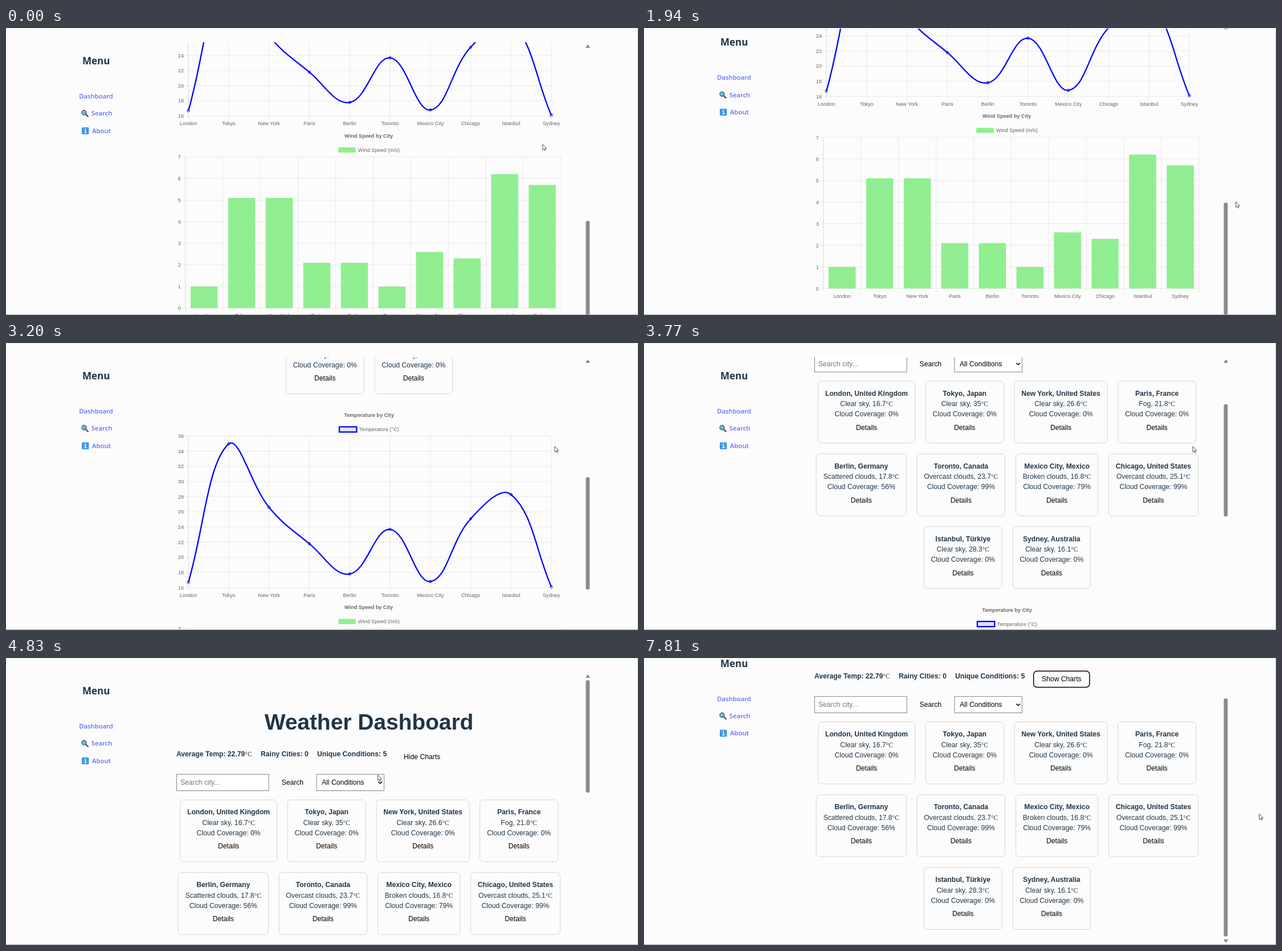
These frames come from a looping animation (1109x505 px, 8 s). An HTML page:

```html
<!DOCTYPE html>
<html lang="en">
<head>
<meta charset="utf-8">
<title>Weather Dashboard</title>
<style>
html, body { margin: 0; width: 100%; height: 100%; overflow: hidden; background: #fcfcfc; }
svg { display: block; }
#stage {
  --s: 0; --p: 0; --x: 0; --y: 0; --k: .375; --h: 198;
  font: 12.16px "Liberation Sans", Arial, sans-serif;
  fill: #213547;
  animation: 8s step-end -4ms infinite;
  animation-name: scroll, page, cursor, thumb;
}
#page { transform: translateY(calc(var(--p) * -1px)); }
#content { transform: translateY(calc(var(--s) * -1px)); }
#cursor { transform: translate(calc(var(--x) * 1px), calc(var(--y) * 1px)); }
#thumb { height: calc(var(--h) * 1px); transform: translateY(calc(var(--s) * var(--k) * 1px)); }
.shown { animation: shown 8s step-end -4ms infinite; }
.hidden { animation: hidden 8s step-end -4ms infinite; }
#hover { animation: hover 8s step-end -4ms infinite; }
.mid { text-anchor: middle; }
.end { text-anchor: end; }
.bold { font-weight: 700; }
.black { fill: #000; }
.hint { fill: #757575; }
.deg { font: 400 11.5px "Liberation Serif", serif; }
.h1 { font-size: 38.9px; }
.menu { font: 700 17px "Open Sans", sans-serif; }
.link { font: 600 11.3px "Open Sans", sans-serif; fill: #646cff; }
.chart { font-size: 9.12px; fill: #666; }
.grid { fill: none; stroke: #000; stroke-opacity: .1; stroke-width: .76; }
.card { fill: none; stroke: #ccc; stroke-width: .8; }
.field { fill: #fff; stroke: #767676; stroke-width: .9; }
.bar { fill: #8b8b8b; }

@keyframes scroll {
  0% { --s: 800.5 }
  1.875% { --s: 802.3 }
  38.5% { --s: 740 }
  40% { --s: 525 }
  42.125% { --s: 425 }
  43.75% { --s: 290 }
  45.25% { --s: 198 }
  47.125% { --s: 182.5 }
  48.75% { --s: 150 }
  50.375% { --s: 35 }
  52.125% { --s: 0 }
  86.5%, 100% { --s: 88.5 }
}
@keyframes page {
  0% { --p: 0 }
  8.5% { --p: 1 }
  10.25% { --p: 48.5 }
  24.25% { --p: 32.7 }
  26.125% { --p: 0 }
  97.625%, 100% { --p: 48.5 }
}
@keyframes cursor {
  0% { --x: 941.7; --y: 204.8 }
  5.625% { --x: 1038.5; --y: 305.8 }
  34.75% { --x: 963; --y: 182 }
  57.5% { --x: 685; --y: 210.5 }
  60.375% { --x: 652.5; --y: 205.8 }
  62% { --x: 700; --y: 190.5 }
  64.125% { --x: 728; --y: 178 }
  65.75% { --x: 740; --y: 162 }
  67.375% { --x: 744; --y: 148 }
  72.75% { --x: 744; --y: 172 }
  81.5% { --x: 850; --y: 179 }
  83.125% { --x: 957.3; --y: 188 }
  91.5% { --x: 1034; --y: 224 }
  94%, 100% { --x: 1079.7; --y: 274.3 }
}
@keyframes thumb {
  0% { --k: .375; --h: 198 }
  78%, 100% { --k: .91; --h: 419 }
}
@keyframes hover {
  0% { stroke: transparent }
  64.125% { stroke: #646cff }
  67.375% { stroke: transparent }
  72.75% { stroke: #646cff }
  74.5%, 100% { stroke: #000 }
}
@keyframes shown {
  0% { visibility: visible }
  78%, 100% { visibility: hidden }
}
@keyframes hidden {
  0% { visibility: hidden }
  78%, 100% { visibility: visible }
}
</style>
</head>
<body>
<svg id="stage" width="1109" height="505" viewBox="0 0 1109 505">
  <defs><clipPath id="view"><rect x="290" y="25" width="740" height="528"/></clipPath></defs>
  <g id="page">
    <g id="nav">
      <path d="M140.4 152.4l3.4 3.2" stroke="#5b4a4f" stroke-width="2.4" stroke-linecap="round"/>
      <circle cx="137" cy="149" r="4" fill="#55bdf0" stroke="#4a5560" stroke-width="1.3"/>
      <path d="M134.8 148.6a2.4 2.4 0 0 1 2-2" fill="none" stroke="#c9ecfb" stroke-width=".9"/>
      <rect x="133" y="174.8" width="12.4" height="12.2" rx="1.6" fill="#3f97e8"/>
      <path d="M137.6 179.6h2v4.4m-2.2 0h4.2" fill="none" stroke="#fff" stroke-width="1.3"/>
      <circle cx="139.2" cy="177.3" r="1" fill="#fff"/>
    </g>
    <g clip-path="url(#view)"><g id="content"></g></g>
    <path class="bar" d="M1017 35h8l-3.2-5.2q-.8-1-1.6 0z"/>
    <path class="bar" d="M1017 543.6h8l-3.2 5.2q-.8 1-1.6 0z"/>
    <rect id="thumb" class="bar" x="1017.4" y="39" width="6.8" rx="3.4"/>
  </g>
  <rect width="1109" height="1.2" fill="#e3f3ec"/>
  <path d="M0 504.5H1109" stroke="#a3a3a3"/>
  <path d="M1108.5 1V505" stroke="#cfcfcf"/>
  <path id="cursor" d="M0 0V9.8L2.2 7.7 3.7 11.1 5.2 10.4 3.8 7.1H6.8Z" fill="#fff" stroke="#333" stroke-width=".85" stroke-linejoin="round"/>
</svg>
<script>
const cities = ['London', 'Tokyo', 'New York', 'Paris', 'Berlin', 'Toronto', 'Mexico City', 'Chicago', 'Istanbul', 'Sydney'];
const countries = ['United Kingdom', 'Japan', 'United States', 'France', 'Germany', 'Canada', 'Mexico', 'United States', 'Türkiye', 'Australia'];
const skies = ['Clear sky', 'Clear sky', 'Clear sky', 'Fog', 'Scattered clouds', 'Overcast clouds', 'Broken clouds', 'Overcast clouds', 'Clear sky', 'Clear sky'];
const temps = [16.7, 35, 26.6, 21.8, 17.8, 23.7, 16.8, 25.1, 28.3, 16.1];
const cover = [0, 0, 0, 0, 56, 99, 79, 99, 0, 0];
const winds = [1, 5.1, 5.1, 2.1, 2.1, 1, 2.6, 2.3, 6.2, 5.7];
const cardLeft = [305.7, 494, 650, 831.5, 302, 479, 652.5, 815.4, 491, 647];
const cardWidth = [169.8, 137.3, 163, 137.2, 158.6, 154.6, 144.2, 157, 137.3, 136.6];

const text = (x, y, str, cls = '') =>
  `<text x="${x}" y="${y}" class="${cls}">${str.replace('℃', '<tspan class="deg">°C</tspan>')}</text>`;
const box = (x, y, w, h, attrs) => `<rect x="${x}" y="${y}" width="${w}" height="${h}" ${attrs}/>`;
const hLine = (x1, x2, y) => `M${x1} ${y}H${x2}`;
const vLine = (x, y1, y2) => `M${x} ${y1}V${y2}`;

function header() {
  return text(637, 125.8, 'Weather Dashboard', 'h1 bold mid') +
    text(299, 172.8, 'Average Temp: 22.79℃', 'bold') +
    text(447, 172.8, 'Rainy Cities: 0', 'bold') +
    text(546, 172.8, 'Unique Conditions: 5', 'bold') +
    `<g class="shown">${box(683.6, 160, 93.8, 28.4, 'id="hover" rx="6" fill="none" stroke-width="1.4"')}${text(698, 178.3, 'Hide Charts', 'black')}</g>` +
    `<g class="hidden">${box(683.6, 160, 98.2, 28.4, 'rx="6" fill="#fdfdfd" stroke="#000" stroke-width="1.5"')}${text(698, 178.3, 'Show Charts', 'black')}</g>` +
    box(299.5, 204.7, 161.6, 28.8, 'class="field"') + text(306, 223.3, 'Search city...', 'hint') +
    text(483.6, 223.3, 'Search', 'black') +
    box(545, 204.7, 118.3, 28.8, 'class="field"') + text(554, 223.3, 'All Conditions', 'black') +
    '<path d="M653.4 217.6l3.2 3.2 3.2-3.2" fill="none" stroke="#000" stroke-width="1.5"/>';
}

function card(i) {
  const x = cardLeft[i], w = cardWidth[i], mid = x + w / 2;
  const y = 249.6 + 128 * Math.floor(i / 4);
  return box(x, y, w, 109, 'class="card" rx="6"') +
    text(mid, y + 25.8, `${cities[i]}, ${countries[i]}`, 'bold mid') +
    text(mid, y + 44, `${skies[i]}, ${temps[i]}℃`, 'mid') +
    text(mid, y + 62.2, `Cloud Coverage: ${cover[i]}%`, 'mid') +
    text(mid, y + 85.6, 'Details', 'black mid');
}

// Cardinal spline with distance-weighted control points, kept inside the plot.
function spline(pts, tension, top, bottom) {
  const clamp = y => Math.min(bottom, Math.max(top, y));
  const ctrl = pts.map(([x, y], i) => {
    const a = pts[Math.max(i - 1, 0)], b = pts[Math.min(i + 1, pts.length - 1)];
    const da = Math.hypot(x - a[0], y - a[1]), db = Math.hypot(b[0] - x, b[1] - y);
    const fa = tension * da / (da + db), fb = tension * db / (da + db);
    const dx = b[0] - a[0], dy = b[1] - a[1];
    return [x - fa * dx, clamp(y - fa * dy), x + fb * dx, clamp(y + fb * dy)];
  });
  return 'M' + pts[0] + pts.slice(1).map((p, i) =>
    `C${ctrl[i].slice(2)} ${ctrl[i + 1].slice(0, 2)} ${p}`).join('');
}

function tempChart() {
  const left = 320, right = 957, top = 689, bottom = 955.4;
  const px = i => left + i * (right - left) / 9;
  const py = v => bottom - (v - 16) * (bottom - top) / 20;
  const pts = temps.map((v, i) => [px(i), py(v)]);
  let grid = vLine(left, top, bottom), out = '';
  for (let v = 16; v <= 36; v += 2) {
    grid += hLine(left - 6, right, py(v));
    out += text(312, py(v) + 3.2, String(v), 'end');
  }
  cities.forEach((c, i) => {
    grid += vLine(px(i), top, bottom + 6);
    out += text(px(i), 971.8, c, 'mid');
  });
  const blue = 'stroke="#00f" fill="#00f" fill-opacity=".1"';
  return text(637, 655, 'Temperature by City', 'bold mid') +
    box(584.9, 672.5, 30.4, 9.1, blue + ' stroke-width="2.28"') +
    text(619.6, 680.2, 'Temperature (°C)') +
    `<path class="grid" d="${grid}"/>` + out +
    `<path d="${spline(pts, .4, top, bottom)}" fill="none" stroke="#00f" stroke-width="2.28"/>` +
    pts.map(([x, y]) => `<circle cx="${x}" cy="${y}" r="2.3" ${blue} stroke-width=".8"/>`).join('');
}

function windChart() {
  const left = 314.7, step = 65.92, right = left + 10 * step, top = 1027.3, bottom = 1293.4;
  const py = v => bottom - v * (bottom - top) / 7;
  let grid = vLine(left, top, bottom), out = '', bars = '';
  for (let v = 0; v <= 7; v++) {
    grid += hLine(left - 6, right, py(v));
    out += text(306.8, py(v) + 3.2, String(v), 'end');
  }
  for (let i = 0; i <= 10; i++) grid += vLine(left + i * step, top, bottom + 6);
  cities.forEach((c, i) => {
    const mid = left + (i + .5) * step, w = step * .72;
    bars += box(mid - w / 2, py(winds[i]), w, bottom - py(winds[i]), 'fill="#90ee90"');
    out += text(mid, 1309.9, c, 'mid');
  });
  return text(636.6, 993, 'Wind Speed by City', 'bold mid') +
    box(583.2, 1010.6, 30.4, 9.1, 'fill="#90ee90"') +
    text(617.8, 1018.2, 'Wind Speed (m/s)') +
    `<path class="grid" d="${grid}"/>` + bars + out;
}

document.getElementById('nav').insertAdjacentHTML('beforeend',
  text(134, 64.2, 'Menu', 'menu') +
  text(128.2, 124, 'Dashboard', 'link') +
  text(149.8, 154.4, 'Search', 'link') +
  text(151, 184.8, 'About', 'link'));
document.getElementById('content').innerHTML =
  header() + cities.map((c, i) => card(i)).join('') +
  `<g class="chart shown">${tempChart()}${windChart()}</g>`;
</script>
</body>
</html>
```
